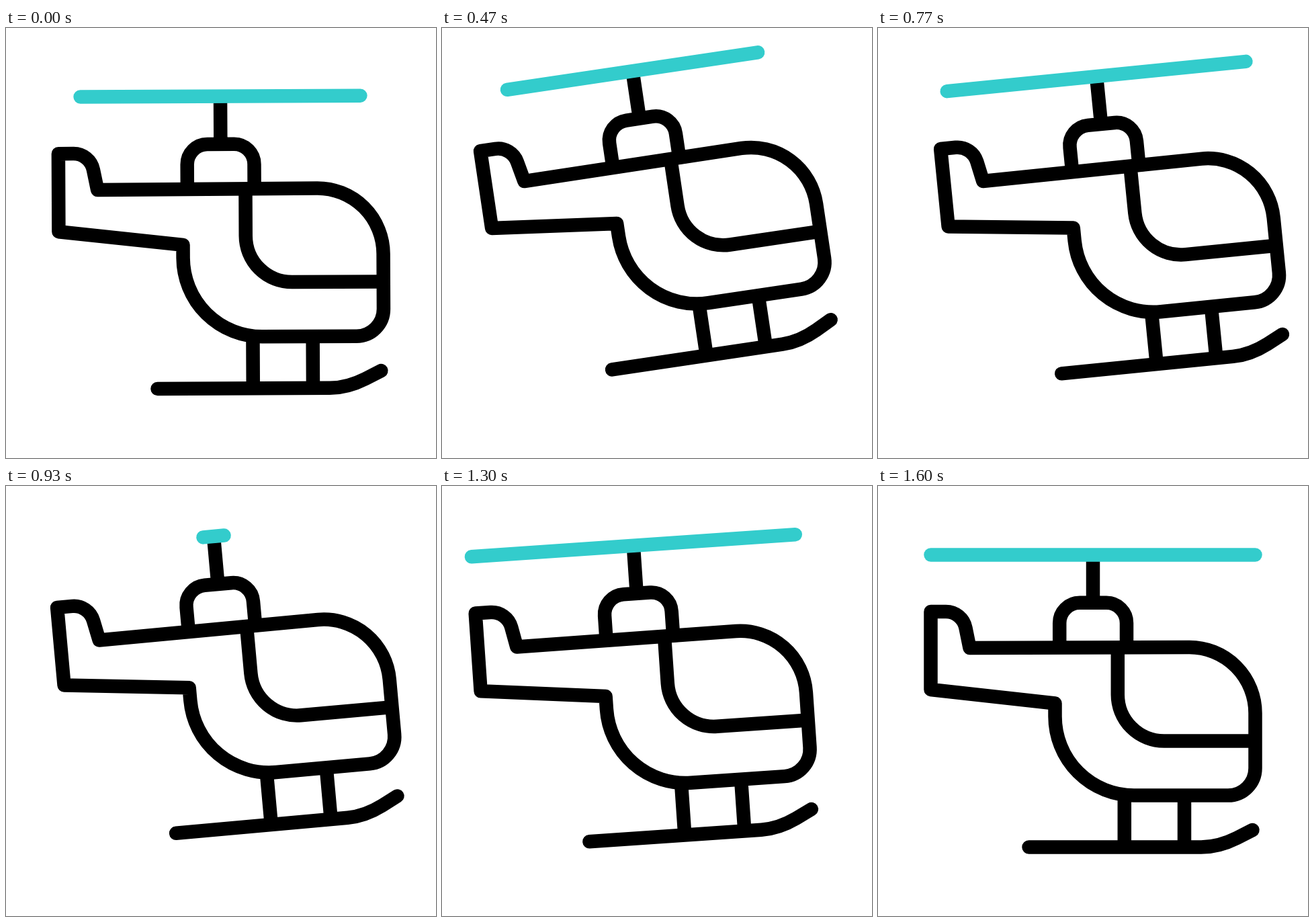
An HTML page with a canvas for the animation above (1670 ms loop, 640 px wide and 640 px high).

```html
<!DOCTYPE html>
<html lang="en">
<head>
<meta charset="utf-8">
<title>Helicopter</title>
<style>
  html, body { margin: 0; width: 100%; height: 100%; overflow: hidden; background: #fff; }
  canvas { display: block; width: 640px; height: 640px; }
</style>
</head>
<body>
<canvas id="stage" width="640" height="640"></canvas>
<script>
const ctx = document.getElementById('stage').getContext('2d');
const LOOP = 1670, STEP = 100 / 3, LAST = 48;
const STROKE = 20.5;

// Flight path: [tick, x, y, tilt in degrees]
const flight = [
  [-1, 0, 0, 0],
  [0, 0, -0.9, 0.26],
  [4, -2.6, -11.8, 2.65],
  [8, -6.5, -27.9, 6.3],
  [12, -9, -38.6, 8.5],
  [16, 2.5, -41, 8],
  [19, 16, -36.4, 7],
  [23.4, 26.5, -31.2, 5.6],
  [28, 8.6, -28.4, 5.17],
  [31, -10.2, -26, 5.35],
  [34, -25.2, -23.5, 5.45],
  [35.4, -26.3, -22, 5.3],
  [38.5, -21.6, -15.4, 4.2],
  [43, -7.5, -5.35, 1.45],
  [48, 0, 0, 0]
];

// Ticks at which the blade is alternately full and shortest; it stays full afterwards
const bladeTurns = [-0.95, 3, 7.05, 11.15, 15.3, 19.65, 23.7, 27.8, 32.6];
const BLADE_MIN = 0.06;

const airframe = new Path2D(
  'M78.5 187H101A30 30 0 0 1 130.4 211.1L136.5 241L463.5 240' +
  'A98 98 0 0 1 561.5 338V420A40.5 40.5 0 0 1 521 460.5H381' +
  'A117.5 117.5 0 0 1 263.5 343V323.5L78.5 303Z');
const fittings = new Path2D(
  'M320 112V174' +
  'M270.2 250V204A30 30 0 0 1 300.2 173.8H340A30 30 0 0 1 370 204V250' +
  'M356.8 240V310.5A69 69 0 0 0 425.8 379.5H561.5' +
  'M366.8 460V537M456 460V537');
const skid = new Path2D('M224.5 537.5H481C499 537.5 517 532.5 534 524L557.5 512');

const smooth = u => u * u * (3 - 2 * u);

function slope(i, c) {
  if (i === 0 || i === flight.length - 1) return 0;
  const a = flight[i - 1], b = flight[i + 1];
  return (b[c] - a[c]) / (b[0] - a[0]);
}

function poseAt(tick) {
  let i = 0;
  while (i < flight.length - 2 && tick >= flight[i + 1][0]) i++;
  const a = flight[i], b = flight[i + 1];
  const span = b[0] - a[0], u = (tick - a[0]) / span, s = smooth(u);
  return [1, 2, 3].map(c =>
    a[c] + (b[c] - a[c]) * s +
    span * u * (1 - u) * ((1 - u) * slope(i, c) - u * slope(i + 1, c)));
}

function bladeAt(tick) {
  const next = bladeTurns.findIndex(t => t > tick);
  if (next < 1) return 1;
  const from = bladeTurns[next - 1];
  const s = smooth((tick - from) / (bladeTurns[next] - from));
  return BLADE_MIN + (1 - BLADE_MIN) * (next % 2 ? 1 - s : s);
}

function draw(tick) {
  const [x, y, tilt] = poseAt(tick);
  ctx.setTransform(1, 0, 0, 1, 0, 0);
  ctx.fillStyle = '#fff';
  ctx.fillRect(0, 0, 640, 640);

  ctx.translate(320 + x, 320 + y);
  ctx.rotate(-tilt * Math.PI / 180);
  ctx.translate(-320, -320);

  ctx.lineWidth = STROKE;
  ctx.lineJoin = 'round';
  ctx.strokeStyle = '#000';
  ctx.lineCap = 'butt';
  ctx.stroke(fittings);
  ctx.lineCap = 'round';
  ctx.stroke(airframe);
  ctx.stroke(skid);

  const half = 241.5 * bladeAt(tick);
  ctx.strokeStyle = '#33cccc';
  ctx.beginPath();
  ctx.moveTo(320 - half, 102.5);
  ctx.lineTo(320 + half, 102.5);
  ctx.stroke();
}

const start = performance.now();
function tickLoop() {
  const t = (performance.now() - start) % LOOP;
  draw(Math.min(LAST, Math.floor((t + 5) / STEP)));
  requestAnimationFrame(tickLoop);
}
tickLoop();
</script>
</body>
</html>
```
